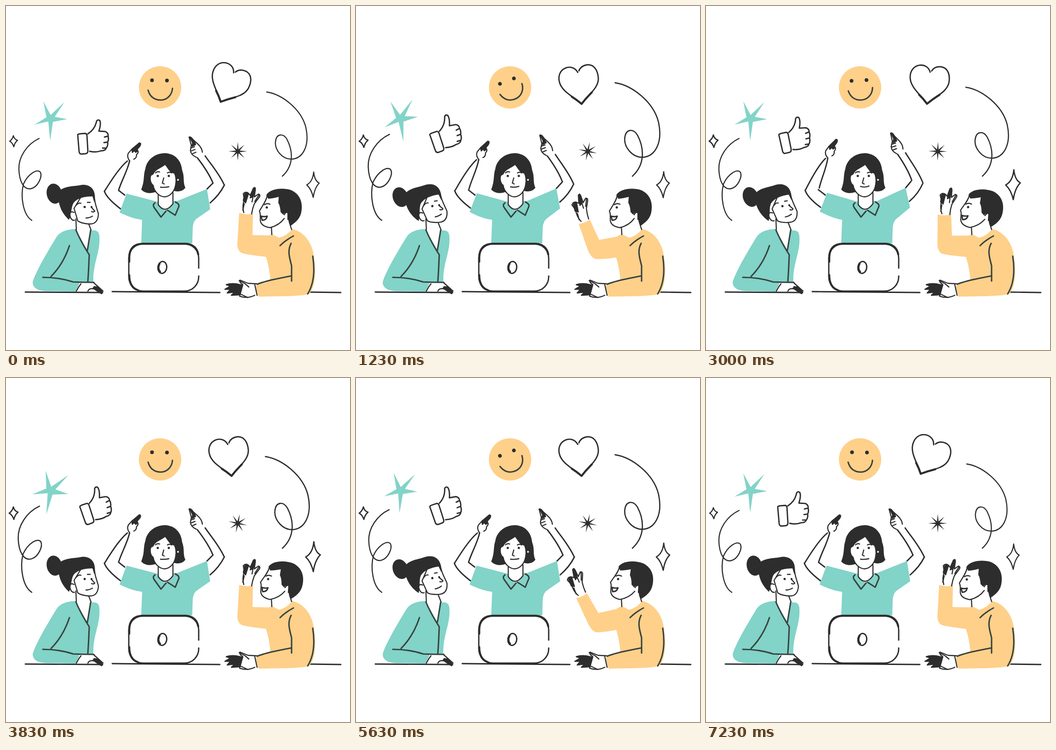
An HTML page for the animation above (7310 ms loop, 748 px wide and 748 px high).

```html
<!DOCTYPE html>
<html lang="en">
<head>
<meta charset="utf-8">
<title>Team talk</title>
<style>
html, body { margin: 0; width: 100%; height: 100%; overflow: hidden; background: #fff; }
svg { display: block; width: 100vw; height: 100vh; }
.ink { fill: none; stroke: #2d2d2d; stroke-width: 2.9; stroke-linecap: round; stroke-linejoin: round; }
.paper { fill: #fff; }
.thin { stroke-width: 2.4; }
.bold { stroke-width: 4.4; }
.soft { stroke: #38423e; stroke-width: 3.1; }
.dark { fill: #2d2d2d; }
.teal { fill: #82d3c8; }
.sun { fill: #fed08a; }
</style>
</head>
<body>
<svg viewBox="0 0 748 748">
  <!-- floating symbols -->
  <circle class="sun" cx="335" cy="177" r="46"/>
  <g id="smile">
    <circle class="dark" cx="317.5" cy="161.5" r="4"/>
    <circle class="dark" cx="350" cy="162" r="4"/>
    <path class="ink soft" d="M309 183C313 198 324 205 337 204.5C351 204 361 193 362 179"/>
  </g>
  <g id="heart" class="ink">
    <path d="M485 144C481 133 471 129 461 131C448 134 441 146 443 160C445 180 468 194 485 213C500 196 526 184 528 162C529 144 522 131 508 130C497 130 491 135 488 141"/>
    <path class="bold" d="M466 195Q476 203 485 213Q496 202 510 191"/>
  </g>
  <g id="thumb" class="ink">
    <path d="M156 281Q155 279 160 278L172 277Q175 277 176 281L178 315Q178 320 174 321L164 322Q160 322 159 317Z"/>
    <path d="M178 278C189 271 195 261 197 250Q200 246 204 249C207 256 204 266 202 272L216 273Q223 276 222 283Q224 290 221 296Q222 304 218 309Q216 315 206 315Q196 319 182 316M222 283L214 285M221 296L213 297M218 309L210 309"/>
  </g>
  <path id="curlL" class="ink thin" d="M72 288C46 300 27 328 28 355C29 382 39 401 55 397C70 393 79 371 75 362C69 352 48 365 38 387C31 414 37 454 56 466"/>
  <path id="curlR" class="ink thin" d="M567 187C600 192 642 224 652 264C661 305 645 331 622 333C600 334 584 312 586 295C588 277 603 276 611 290C625 317 625 348 601 370"/>
  <path id="star" class="teal" d="M81 207L97 237L127 209L106 241L133 246L102 252L96 293L92 251L62 258L88 242Z"/>
  <path id="burst" class="dark"/>
  <path id="sparkL" class="ink thin" d="M16 282Q18 290 25 292Q19 297 17 306Q14 297 8 294Q14 290 16 282Z"/>
  <path id="sparkR" class="ink thin" d="M669 361Q671 380 681 385Q671 395 668 416Q664 398 654 389Q667 382 669 361Z"/>

  <!-- woman in the middle -->
  <path id="upperL" class="ink"/>
  <path id="upperR" class="ink"/>
  <g id="foreL" class="ink">
    <path d="M264 337C247 351 229 379 214 403M269 336C264 359 251 380 245 400"/>
    <path class="paper thin" d="M269 337Q262 328 266 320L274 311L290 298Q295 298 291 305L285 312Q290 318 284 323Q284 331 278 333"/>
    <path class="dark" d="M274 312L290 298Q293 299 291 303L284 311Q287 316 282 318L279 314L275 318Z"/>
  </g>
  <g id="foreR" class="ink">
    <path d="M433 326C446 345 463 364 474 388M416 330C430 348 443 368 450 385"/>
    <path class="paper thin" d="M414 329Q402 324 401 314L403 303L398 285Q402 283 407 291L417 300Q426 308 427 318"/>
    <path class="dark" d="M400 286L408 293L412 301L405 305L406 297Z"/>
    <path class="thin" d="M402 309l8-3M403 315l8-3M406 321l7-3"/>
  </g>
  <path id="shirt" class="teal"/>
  <path class="paper" d="M331 405L331 428Q347 460 364 428L363 402Z"/>
  <path class="ink thin" d="M331 408L331 432Q346 453 363 430L363 406"/>
  <path class="ink soft" d="M324 428Q318 432 322 438L337 459L348 446M368 426Q379 431 375 438L368 455L351 444"/>
  <path class="dark" d="M346 320C323 320 306 335 303 354C298 369 302 380 294 399C302 408 316 409 328 403L364 401C373 406 386 402 390 395C384 383 389 372 383 357C381 335 367 321 346 320Z"/>
  <path class="ink paper thin" d="M346 344C339 351 325 353 319 366C311 366 312 384 320 390C322 404 334 415 345 415C357 414 367 403 369 388C371 378 369 368 366 363C356 362 353 352 346 344Z"/>
  <path class="ink thin" d="M325 363Q329 359 334 361M351 363Q356 360 360 363M343 374L340 385L344 387"/>
  <g class="dark"><circle cx="330" cy="369.5" r="2.5"/><circle cx="354" cy="369.5" r="2.5"/></g>
  <circle class="paper" cx="374" cy="378" r="2"/>
  <path id="mouth" class="ink thin"/>

  <!-- laptop and table -->
  <rect class="ink paper" x="267" y="517" width="152" height="103" rx="31"/>
  <path class="ink bold" d="M268 556V546Q269 518 297 517H391Q414 519 418 540M268 585Q268 612 287 618"/>
  <path class="paper" d="M415 571h7v15h-7z"/>
  <ellipse class="ink" cx="340" cy="568.5" rx="9.5" ry="13" transform="rotate(8 340 568)"/>
  <path class="ink bold" d="M334 560Q328 570 335 578"/>
  <path class="ink" d="M42 622L207 623M231 621L465 623M655 622L728 623"/>

  <!-- woman on the left -->
  <path class="teal" d="M151 485C135 485 118 490 110 502C90 535 66 575 58 600C58 615 72 621 100 620L152 621L160 602L190 601C188 560 206 535 203 500C202 489 196 487 184 488L177 531Z"/>
  <path class="ink thin" d="M152 463L153 487M179 472L185 487"/>
  <path class="ink soft" d="M138 521C130 545 116 570 98 588M80 590C100 590 125 593 146 600Q168 601 191 601M152 487Q162 511 181 541Q180 570 178 599M184 488L177 531"/>
  <path class="paper" d="M160 603L191 603L211 624L195 620L180 614L153 620Z"/>
  <path class="ink thin" d="M153 620L158 611L163 604M178 620Q181 613 191 615M191 602L211 620"/>
  <path class="dark" d="M191 609L200 610L212 623L208 627L198 621L188 614Z"/>
  <g id="headL">
    <ellipse class="dark" cx="105" cy="408" rx="16.5" ry="22" transform="rotate(-12 105 408)"/>
    <path class="ink paper thin" d="M192 412C192 430 199 442 201 453C200 466 195 474 183 474C172 474 161 471 156 467L148 440L165 412Z"/>
    <path class="dark" d="M113 405C126 390 147 393 164 389C181 387 192 397 193 411L192 427L188 414C170 414 155 418 147 428C141 438 143 452 137 465C122 451 113 434 113 405Z"/>
    <path class="ink paper thin" d="M148 449Q139 444 139 455Q141 467 149 466"/>
    <path class="ink thin" d="M153 433Q158 427 163 429M177 427L183 427M186 438L193 446Q191 449 186 447M174 461Q181 461 188 457"/>
    <g class="dark"><circle cx="171" cy="437" r="2.5"/><circle cx="186" cy="437" r="2.2"/></g>
  </g>

  <!-- man on the right -->
  <path class="sun" d="M622 485C649 490 667 517 670 547C674 580 673 611 659 626C640 632 590 631 549 632L541 604L575 598C574 580 570 560 565 545L567 501L578 496L594 504Q612 499 622 485Z"/>
  <path id="sleeve" class="sun"/>
  <path class="ink soft" d="M596 521Q608 509 625 500M620 516C611 533 617 548 621 565L621 598M546 605C567 596 595 592 620 587M667 544C671 570 671 602 656 626"/>
  <path class="ink thin" d="M577 478L578 497M616 470L621 486"/>
  <g id="headR">
    <path class="paper" d="M567 411L558 432L550 443L553 466Q556 480 577 482L604 464L617 470L610 415Z"/>
    <path class="ink thin" d="M568 412C566 424 559 432 551 446Q553 450 553 455L553 467Q555 479 574 482Q594 477 605 462"/>
    <path class="dark" d="M566 411C575 396 603 395 619 400C641 409 646 430 642 449C639 463 630 470 619 478Q612 468 613 452Q607 446 603 454L597 448Q596 434 592 428L593 415Q578 419 570 419Z"/>
    <path class="ink paper thin" d="M605 454Q609 446 613 450V464"/>
    <path class="ink thin" d="M562 432Q567 428 574 431"/>
    <circle class="dark" cx="567" cy="438" r="2.5"/>
    <path class="ink" d="M555 457Q562 459 568 457Q566 466 557 466Z"/>
  </g>
  <g id="handR" class="ink thin">
    <path class="paper" d="M517 449Q513 437 518 421L516 408Q522 402 528 408L531 412L538 396Q543 392 542 400L540 415L549 409Q555 411 549 418L540 430Q536 440 534 452"/>
    <path class="dark" d="M516 423L519 409Q526 403 527 409L521 428ZM531 417L538 398Q542 394 542 400L537 415Z"/>
    <path d="M515 444L518 430M537 415L535 426M550 411L541 425"/>
  </g>
  <g class="ink thin">
    <path class="paper" d="M545 604L526 603L509 596Q506 600 515 606L508 631Q525 637 541 629"/>
    <path class="dark" d="M479 606Q493 601 513 607L508 628L490 629L498 622L481 624L488 616L476 616L488 609Z"/>
    <path d="M507 597L520 604L528 611M509 626L526 634M541 606L546 629"/>
  </g>
</svg>
<script>
const LOOP = 7310;
const el = id => document.getElementById(id);
let now = 0;

function ease(u) {
  u = Math.min(1, Math.max(0, u));
  return u * u * (3 - 2 * u);
}

// 0 to 1 between phases a and b, back to 0 between c and d, n times per loop
function swing(n, a, b, c, d) {
  const p = now * n / LOOP % 1;
  return ease((p - a) / (b - a)) - ease((p - c) / (d - c));
}

function pose(id, x, y, turn = 0, size = 1, dx = 0, dy = 0) {
  el(id).setAttribute('transform',
    `translate(${x + dx} ${y + dy}) rotate(${turn}) scale(${size}) translate(${-x} ${-y})`);
}

// Blend two paths that share the same commands
function morph(id, a, b, k) {
  const to = b.match(/[\d.]+/g);
  let i = 0;
  el(id).setAttribute('d', a.replace(/[\d.]+/g, n => +n + (to[i++] - n) * k));
}

function buildBurst() {
  const points = [];
  for (let i = 0; i < 16; i++) {
    const r = i % 2 ? 4.5 : 20.5, a = i * Math.PI / 8;
    points.push(504 + r * Math.cos(a) + ' ' + (316 + r * Math.sin(a)));
  }
  el('burst').setAttribute('d', `M${points.join('L')}Z`);
}

function drawSymbols() {
  const early = swing(1, 0, .1, .25, .41), late = swing(1, .41, .63, .64, .8);
  pose('smile', 335, 177, -22 * swing(2, .17, .27, .6, .9));
  pose('heart', 487, 168, 24 - 31 * swing(3, .13, .31, .62, .96));
  pose('thumb', 157, 262, -14.5 * swing(3, .13, .32, .7, .98));
  pose('curlL', 56, 466, 0, 1 + .05 * early + .1 * late);
  pose('curlR', 600, 370, 0, 1 + .11 * swing(3, .17, .29, .5, .75));
  pose('star', 97, 245, 17 * late - 8 * early, 1 + .05 * early + .17 * late);
  pose('burst', 504, 316, 12 * swing(3, .22, .27, .75, .9));
  pose('sparkL', 16, 294, 0, 1 + .13 * swing(4, 0, .08, .64, .95));
  pose('sparkR', 667, 388, 0, 1 + .18 * swing(1, .09, .41, .55, .95));
}

function drawPeople() {
  const lift = swing(4, .08, .36, .53, .73);
  pose('foreL', 222, 403, -11.5 * lift, 1, 4 * lift, -6 * lift);
  pose('foreR', 472, 390, 8 * lift, 1, -7 * lift, -11 * lift);
  morph('upperL', 'M214 403Q219 418 249 441M245 401L258 411', 'M218 398Q224 415 249 433M243 397L261 411', lift);
  morph('upperR', 'M475 389Q464 411 444 428M450 385L437 398', 'M467 380Q458 405 440 420M440 376L430 392', lift);
  morph('shirt',
    'M331 426L262 408L247 449Q275 463 296 465L294 516H405L406 482Q407 466 418 460L444 442L437 398L372 424Z',
    'M331 426L265 404L248 444Q275 460 296 465L294 516H405L406 482Q407 466 418 459L443 433L430 392L372 424Z', lift);
  morph('mouth', 'M336 394Q345 395 354 393', 'M336 390Q346 396 355 389', lift);

  pose('headL', 155, 472, -8 * swing(2, .17, .33, .8, .96));
  pose('headR', 580, 480, 4 * swing(1, .25, .41, .77, .98));

  const reach = swing(2, .17, .4, .6, .88);
  pose('handR', 523, 452, -34 * reach, 1, -33 * reach, 20 * reach);
  morph('sleeve',
    'M507 450Q522 455 537 451L536 498L582 499L572 546Q530 542 512 537Q504 532 503 520Z',
    'M479 479Q492 476 502 468L527 511L582 499L572 546Q545 553 522 553Q513 550 505 535Z', reach);
}

// Two uneven steps in every 100 ms
function frame(ms) {
  const t = ms % LOOP, rest = t % 100;
  now = t - rest + (rest < 30 ? 0 : 30);
  drawSymbols();
  drawPeople();
  requestAnimationFrame(frame);
}
buildBurst();
frame(0);
</script>
</body>
</html>
```
